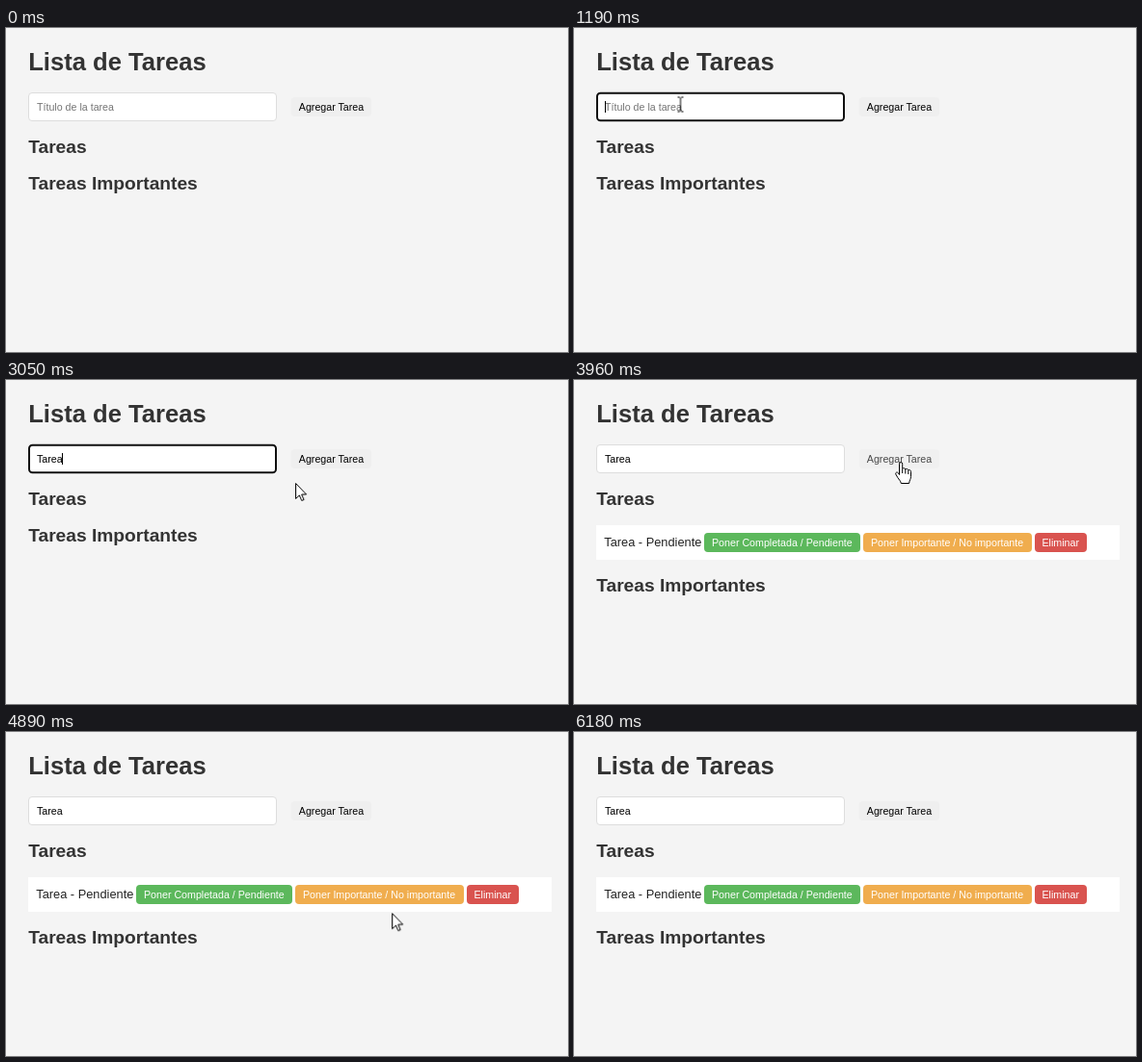
An HTML page that plays this animation: 583x337 px, repeating every 6620 ms.

```html
<!DOCTYPE html>
<html lang="es">
<head>
<meta charset="utf-8">
<title>Lista de Tareas</title>
<style>
  html, body { margin: 0; height: 100%; overflow: hidden; background: #f4f4f4; }
  svg { display: block; width: 583px; height: 337px; font-family: "Liberation Sans", Arial, sans-serif; }

  .h1 { font: bold 25.6px "Liberation Sans", Arial, sans-serif; fill: #333; }
  .h2 { font: bold 19.2px "Liberation Sans", Arial, sans-serif; fill: #333; }
  .small { font-size: 10.667px; }
  .item { font-size: 12.8px; fill: #222; }
  .light { fill: #fff; }
  .hint { fill: #757575; }
  .arrow, .hand { fill: #fff; stroke: #000; stroke-linejoin: round; }
  .beam { fill: none; stroke: #000; }

  /* hard changes */
  .hint, .key, .caret, .ring, .list, .lower, .add, .star, .arrow, .beam, .hand {
    animation: 6620ms step-end infinite;
  }
  .hint { animation-name: hint; }
  .k1 { animation-name: k1; }
  .k2 { animation-name: k2; }
  .k3 { animation-name: k3; }
  .k4 { animation-name: k4; }
  .k5 { animation-name: k5; }
  .caret { animation-name: caret; }
  .ring { animation-name: ring; }
  .list { animation-name: list; }
  .lower { animation-name: lower; }
  .add { animation-name: add; }
  .star { animation-name: star; }
  .arrow { animation-name: arrow; }
  .beam { animation-name: beam; }
  .hand { animation-name: hand; }
  .pointer { animation: move 6620ms linear infinite; }

  @keyframes hint { 0% { visibility: visible } 25.982%, to { visibility: hidden } }
  @keyframes k1 { 0% { visibility: hidden } 25.982%, to { visibility: visible } }
  @keyframes k2 { 0% { visibility: hidden } 28.399%, to { visibility: visible } }
  @keyframes k3 { 0% { visibility: hidden } 30.816%, to { visibility: visible } }
  @keyframes k4 { 0% { visibility: hidden } 31.873%, to { visibility: visible } }
  @keyframes k5 { 0% { visibility: hidden } 34.441%, to { visibility: visible } }
  @keyframes caret {
    0% { visibility: hidden; transform: translateX(32px) }
    15.257% { visibility: visible; transform: translateX(32px) }
    22.81% { visibility: hidden; transform: translateX(32px) }
    25.982% { visibility: visible; transform: translateX(38px) }
    28.399% { visibility: visible; transform: translateX(43px) }
    30.816% { visibility: visible; transform: translateX(47px) }
    31.873% { visibility: visible; transform: translateX(52px) }
    34.441% { visibility: visible; transform: translateX(58px) }
    49.698%, to { visibility: hidden; transform: translateX(58px) }
  }
  @keyframes ring { 0%, 58.61%, to { visibility: hidden } 15.257% { visibility: visible } }
  @keyframes list { 0% { visibility: hidden } 59.819%, to { visibility: visible } }
  @keyframes lower { 0% { transform: none } 59.819%, to { transform: translateY(52px) } }
  @keyframes add { 0%, 65.71%, to { opacity: 1 } 50.15% { opacity: .7 } }
  @keyframes star { 0%, 73.867%, to { opacity: 1 } 72.18% { opacity: .8 } }

  @keyframes arrow {
    0%, 8.01%, 50.15%, 72.18%, 93.353%, to { visibility: hidden }
    .302%, 43.35%, 65.71%, 73.867% { visibility: visible }
  }
  @keyframes beam { 0%, 43.35%, to { visibility: hidden } 8.01% { visibility: visible } }
  @keyframes hand { 0%, 65.71%, 73.867%, to { visibility: hidden } 50.15%, 72.18% { visibility: visible } }
  @keyframes move {
    0%, .302% { transform: translate(520px, 335px); animation-timing-function: cubic-bezier(.2, .4, .6, .97) }
    8.61% { transform: translate(117.5px, 95.5px) }
    9.668%, 11.178% { transform: translate(113.5px, 87px); animation-timing-function: ease-out }
    13.595%, 38.066% { transform: translate(110.5px, 79.5px) }
    39.275% { transform: translate(97px, 82px); animation-timing-function: cubic-bezier(.3, .2, .7, .9) }
    46.073% { transform: translate(300px, 107px) }
    47.885% { transform: translate(309px, 103px); animation-timing-function: ease-out }
    55.5%, 63.595% { transform: translate(339px, 85px); animation-timing-function: ease-in }
    73.565% { transform: translate(400px, 180px); animation-timing-function: step-end }
    73.867% { transform: translate(400px, 188px); animation-timing-function: ease-out }
    83.837%, 84.2% { transform: translate(476px, 276px); animation-timing-function: ease-in-out }
    93.353%, to { transform: translate(506px, 337px) }
  }
</style>
</head>
<body>
<svg viewBox="0 0 583 337">
  <text class="h1" x="23.2" y="44">Lista de Tareas</text>

  <rect x="23.5" y="67.5" width="257" height="29" rx="3.5" fill="#fff" stroke="#ddd"/>
  <rect class="ring" x="24" y="67.7" width="256" height="28.6" rx="3.5" fill="#fff" stroke="#101010" stroke-width="2"/>
  <text class="small hint" x="32" y="86">Título de la tarea</text>
  <text class="small" x="32" y="86"><tspan class="key k1">T</tspan><tspan class="key k2">a</tspan><tspan class="key k3">r</tspan><tspan class="key k4">e</tspan><tspan class="key k5">a</tspan></text>
  <rect class="caret" y="76" width="1" height="12"/>

  <g class="add">
    <rect x="295.6" y="72" width="83.4" height="20" rx="4" fill="#efefef"/>
    <text class="small" x="303.8" y="86">Agregar Tarea</text>
  </g>

  <text class="h2" x="23.2" y="130">Tareas</text>
  <g class="list">
    <rect x="23" y="151" width="543" height="36" fill="#fff"/>
    <text class="item" x="31.3" y="173">Tarea - Pendiente</text>
    <rect x="135" y="159" width="162" height="20" rx="4" fill="#5cb85c"/>
    <text class="small light" x="143" y="173">Poner Completada / Pendiente</text>
    <g class="star">
      <rect x="300" y="159" width="175" height="20" rx="4" fill="#f0ad4e"/>
      <text class="small light" x="308" y="173">Poner Importante / No importante</text>
    </g>
    <rect x="478" y="159" width="54" height="20" rx="4" fill="#d9534f"/>
    <text class="small light" x="485.5" y="173">Eliminar</text>
  </g>
  <text class="h2 lower" x="23.2" y="168">Tareas Importantes</text>

  <g class="pointer">
    <path class="arrow" d="M.5 .5V16.5L4.3 12.9 6.7 18.5 9 17.5 6.6 12H11.5Z"/>
    <path class="beam" d="M-3-7.5h2l1 1 1-1h2M0-6.5V6.5M-3 7.5h2l1-1 1 1h2"/>
    <path class="hand" d="M-1.5 13.5V2.2A1.6 1.6 0 0 1 1.7 2.2V7.5C2.2 6.3 4.6 6.5 4.8 8C5.4 7 7.5 7.2 7.8 8.8C8.6 8 10.5 8.6 10.5 10.4V15.5C10.5 18 9 19 8.6 22.5H.3C0 20-2 18.5-3.2 16.5L-5.3 12.8C-5.6 11-3.6 10.4-2.6 11.8ZM1.7 7.5V12M4.8 8V12.5M7.8 9V13"/>
  </g>
</svg>
</body>
</html>
```
